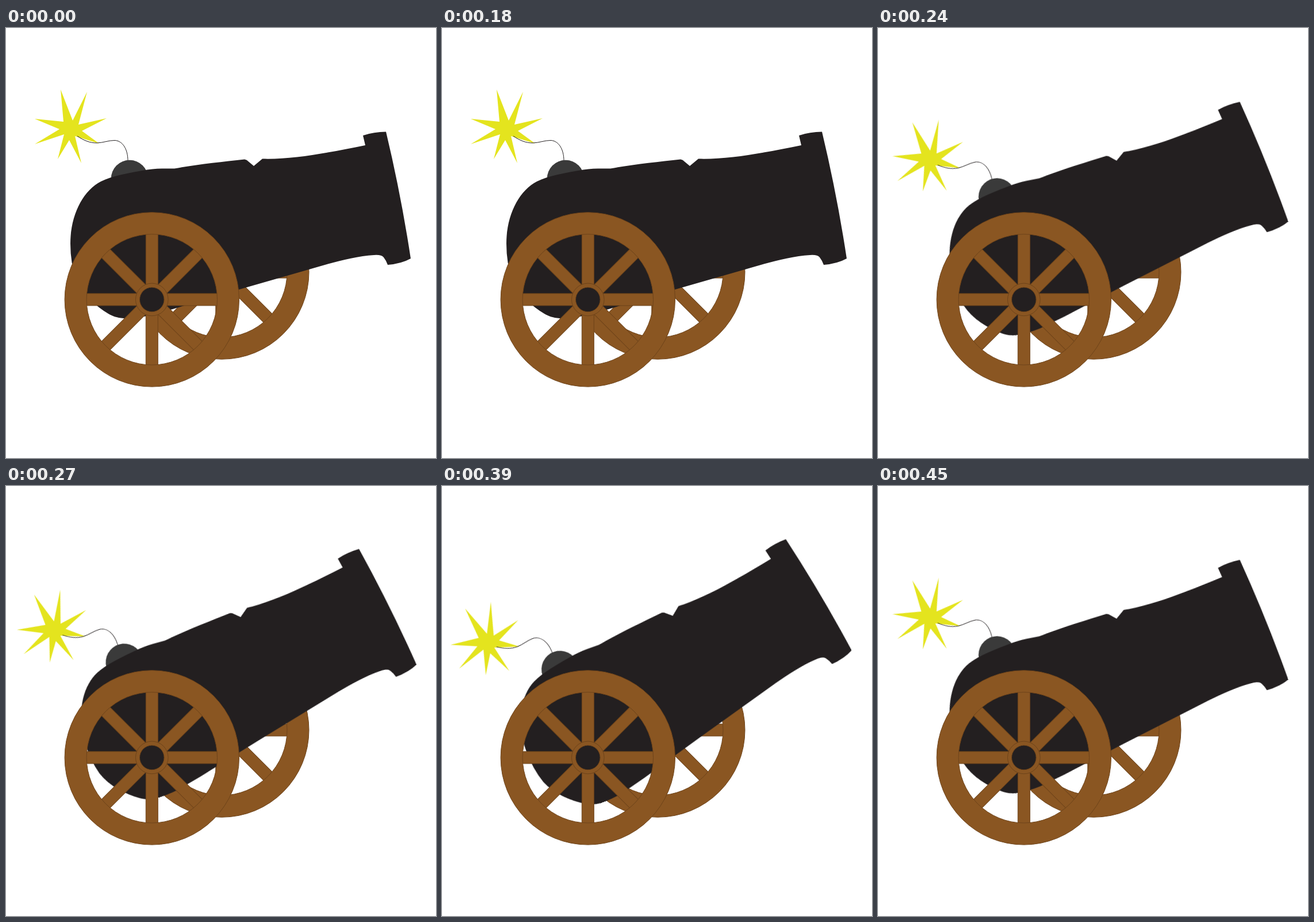
An HTML page for the animation above (480 ms loop, 748 by 748 pixels).

```html
<!DOCTYPE html>
<html lang="en">
<head>
<meta charset="utf-8">
<title>Cannon</title>
<style>
  html, body { margin: 0; width: 100%; height: 100%; overflow: hidden; background: #fff; }
  svg { display: block; width: 100%; height: 100%; }
  .wood { fill: #8a5622; stroke: #6d431a; stroke-width: 1; }
  .iron { fill: #231f20; }
  .barrel {
    transform-origin: 375px 318.5px;
    animation: aim 480ms step-end infinite;
  }
  @keyframes aim {
    0%     { transform: rotate(0deg); }
    6.25%  { transform: rotate(-3.5deg); }
    37.5%  { transform: rotate(0deg); }
    43.75% { transform: rotate(-5.7deg); }
    50%    { transform: rotate(-11deg); }
    56.25% { transform: rotate(-15.4deg); }
    62.5%  { transform: rotate(-19.6deg); }
    68.75% { transform: rotate(-23.3deg); }
    81.25% { transform: rotate(-19.6deg); }
    87.5%  { transform: rotate(-15.4deg); }
    93.75% { transform: rotate(-11deg); }
    100%   { transform: rotate(0deg); }
  }
</style>
</head>
<body>
<svg viewBox="0 0 748 748">
  <defs>
    <g id="pair">
      <rect x="-10.5" y="-116" width="21" height="90"/>
      <rect x="-10.5" y="26" width="21" height="90"/>
    </g>
    <g id="wheel" class="wood">
      <use href="#pair"/>
      <use href="#pair" transform="rotate(45)"/>
      <use href="#pair" transform="rotate(90)"/>
      <use href="#pair" transform="rotate(135)"/>
      <path fill-rule="evenodd" d="M-151.7 0a151.7 151.7 0 1 1 303.4 0a151.7 151.7 0 1 1 -303.4 0z
        M-113.7 0a113.7 113.7 0 1 0 227.4 0a113.7 113.7 0 1 0 -227.4 0z"/>
      <circle r="28.3"/>
      <circle r="21.3" style="fill:#231f20"/>
    </g>
  </defs>

  <use href="#wheel" x="375.3" y="424.5"/>

  <g class="barrel">
    <path fill="#e4e41e" d="M95 107L116 161L141 111L126 168L175 157L132 179L162 201L120 188
      L131 235L110 195L90 228L101 185L50 202L93 176L50 158L100 163Z"/>
    <path fill="none" stroke="#231f20" d="M124 188C136 196 146 200 158 200C170 199.5 178 195.5 189 195.5
      C203 196 212 211 212 231"/>
    <circle cx="215" cy="262" r="32.3" fill="#3a3a3a"/>
    <path class="iron" d="M112 375C112 325 134 283 165 267C185 257 215 252 246 246.5
      C262 244 277 244.5 293 244.5C330 237.5 375 233 415 228.5Q419 229 422 232.5L431 240L446 227.5
      C500 229 560 217 625 204L621 187Q640 180.5 661 180.5Q687 289 704 401Q688 410 664 412
      Q661 404 657 399Q653 394 640 395C605 397 565 409 527 420L405 455L290 489L245 501
      Q224 505 205 505C192 504 185 501 178 497Q161 487 146 472Q130 456 122 437Q112 409 112 375Z"/>
  </g>

  <use href="#wheel" x="253.8" y="472.4"/>
</svg>
</body>
</html>
```
